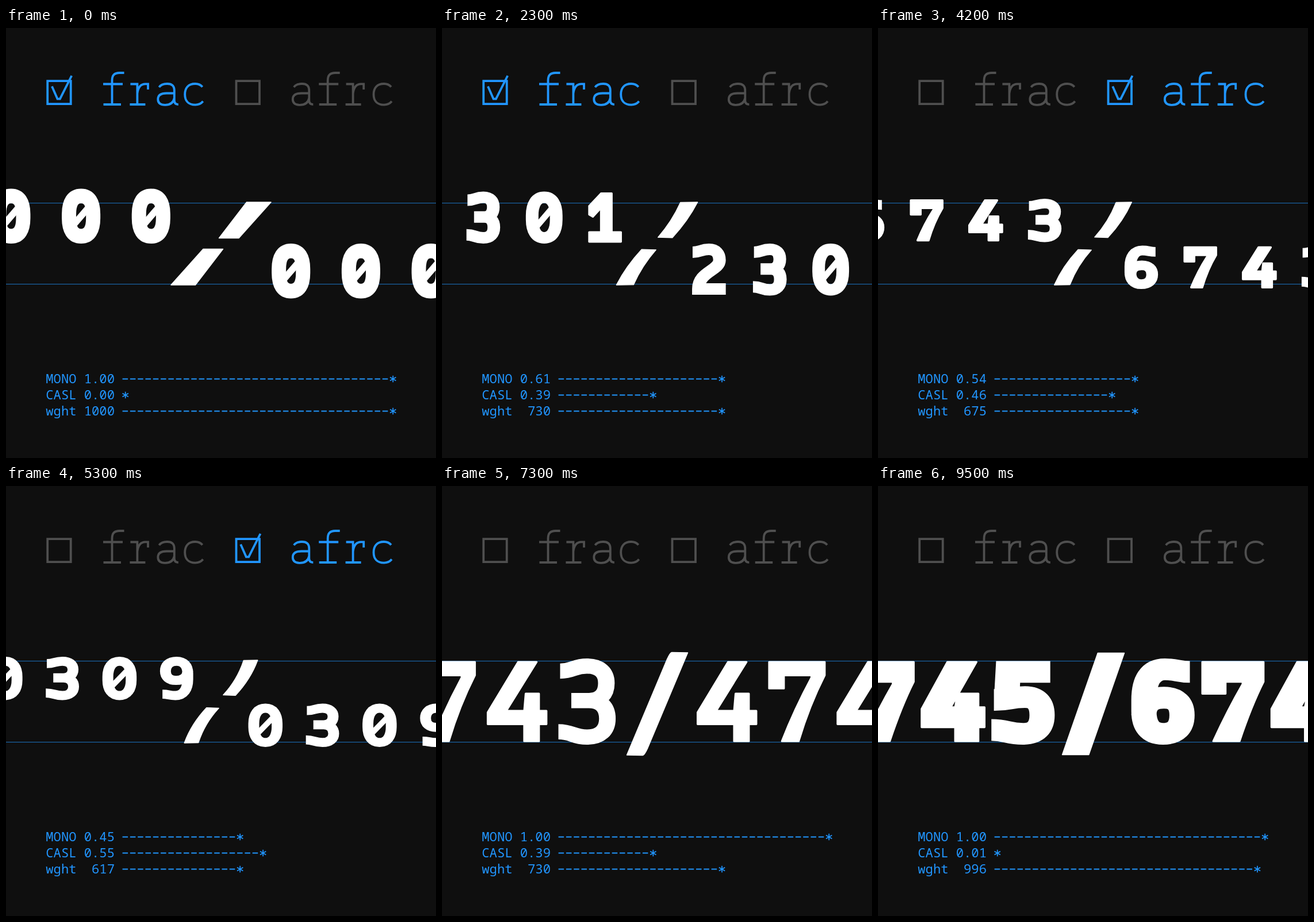
An HTML page for the animation above (9600 ms loop, 748 by 748 pixels).

```html
<!DOCTYPE html>
<html lang="en">
<head>
<meta charset="utf-8">
<title>Fractions</title>
<style>
html, body { margin: 0; width: 100%; height: 100%; overflow: hidden; background: #0f0f0f; }
svg { display: block; width: 100vw; height: 100vh; }
text { font: 500 22.16px "Noto Sans Mono", "DejaVu Sans Mono", monospace; white-space: pre; fill: #2196ff; }
.head path { fill: none; stroke: currentColor; stroke-width: 3.8; }
.bar path { fill: none; stroke: #2196ff; stroke-width: 2.1; }
.bar .star { stroke-width: 1.7; }
</style>
</head>
<body>
<svg viewBox="0 0 748 748" xmlns="http://www.w3.org/2000/svg">
  <rect width="748" height="748" fill="#0f0f0f"/>
  <g class="head" id="head"></g>
  <path d="M0 304.6H748M0 445.6H748" stroke="#2196ff" stroke-width=".75"/>
  <g id="figures"></g>
  <g class="bar" id="bars"></g>
</svg>
<script>
const $ = id => document.getElementById(id);
const BLUE = '#2196ff', GREY = '#4f4f4f';
const STEP = 100, PART = 32, MID = 374;
const ROUND = 1.7; // corner radius of filled figures

// Values at weights 300, 730 and 1000
const modes = [
  { e: [29.2, 29.3, 30.8], H: [85.5, 90.5, 95.5], sx: [11.5, 22, 25], sy: [10.8, 20, 25.5],
    over: 1.6, bottom: 375, top: 375, zero: 1.09 },
  { e: [27.5, 29.5, 32], H: [75.5, 75.5, 81], sx: [10.5, 22, 26], sy: [9.5, 18, 22],
    over: 1.2, bottom: 372.4, top: 378.6, zero: 1.03 },
  { e: [46, 50, 55], H: [149, 150, 150], sx: [11.5, 29, 44], sy: [10.5, 26.5, 38],
    over: 4.4, bottom: 450, top: 300, zero: 1.04 }
];

const lerp = (a, b, t) => a + (b - a) * t;
const byWeight = (v, w) => w < 730
  ? lerp(v[0], v[1], (w - 300) / 430)
  : lerp(v[1], v[2], (w - 730) / 270);
const num = v => +v.toFixed(2);

class Pen {
  constructor(k) { this.k = k; this.d = ''; }
  add(op, ...pts) {
    this.d += op + pts.map(num).join(' ');
    [this.x, this.y] = pts.slice(-2);
    return this;
  }
  m(x, y) { return this.add('M', x, y); }
  l(x, y) { return this.add('L', x, y); }
  q(a, b, x, y) { return this.add('Q', a, b, x, y); }
  c(a, b, c, d, x, y) { return this.add('C', a, b, c, d, x, y); }
  // quarter turns that leave horizontally / vertically
  h(x, y) { return this.c(this.x + this.k * (x - this.x), this.y, x, y - this.k * (y - this.y), x, y); }
  v(x, y) { return this.c(this.x, this.y + this.k * (y - this.y), x - this.k * (x - this.x), y, x, y); }
  // shallow wave, level at both ends so that terminals are cut upright
  s(x, y) { const m = (this.x + x) / 2; return this.c(m, this.y, m, y, x, y); }
}

// Stroked figures: h, Y are half sizes of the centre line, e the outer half width, F the flat half height
const six = (p, h, e, Y) => p.m(.85 * e, -.92 * Y).s(.1 * h, -Y).h(-h, -.05 * Y)
  .l(-h, .3 * Y).v(0, Y).h(h, .42 * Y).v(.05 * h, -.12 * Y).h(-h, .42 * Y);
const stroked = {
  0: (p, h, e, Y) => p.m(0, -Y).h(h, -.1 * Y).l(h, .1 * Y).v(0, Y).h(-h, .1 * Y).l(-h, -.1 * Y).v(0, -Y),
  2: (p, h, e, Y, F) => p.m(-.97 * e, -.86 * Y).s(0, -Y).h(h, -.46 * Y)
    .c(h, .05 * Y, -h, .1 * Y, -h, F).l(e, F),
  3: (p, h, e, Y) => p.m(-.94 * e, -.86 * Y).s(0, -Y).h(.95 * h, -.52 * Y)
    .v(.1 * h, -.03 * Y).l(-.55 * e, -.03 * Y)
    .m(.1 * h, -.03 * Y).h(h, .48 * Y).v(0, Y).s(-e, .85 * Y),
  5: (p, h, e, Y, F) => p.m(.86 * e, -F).l(.13 * e - h, -F).l(.08 * e - h, -.05 * Y)
    .m(-.92 * e, -.05 * Y).s(.1 * h, -.14 * Y)
    .h(h, .42 * Y).v(0, Y).s(-e, .88 * Y),
  6: six,
  8: (p, h, e, Y) => p.m(0, -Y).h(.84 * h, -.54 * Y).c(.84 * h, -.1 * Y, -h, -.04 * Y, -h, .48 * Y)
    .v(0, Y).h(h, .48 * Y).c(h, -.04 * Y, -.84 * h, -.1 * Y, -.84 * h, -.54 * Y).v(0, -Y),
  9: (p, h, e, Y) => six(p, -h, -e, -Y)
};

// Filled figures: y runs from 0 to H
const filled = {
  1(p, e, H, sx, sy) {
    const l = .08 * e - sx / 2, r = l + sx, f = .26 * H;
    p.m(l, 0).l(r, 0).l(r, H - sy).l(e, H - sy).l(e, H).l(-e, H).l(-e, H - sy).l(l, H - sy)
      .l(l, .1 * H + .9 * sx).l(-e + .35 * sx, f + sx).l(-e, f + .8 * sx).l(-e, f);
  },
  4(p, e, H, sx, sy) {
    const r = .5 * e + .33 * sx, wide = 1.25 * sx, low = .71 * H + .45 * sy, up = low - sy;
    const s = .62 * e + .25 * sx;
    p.m(r - wide, 0).l(r, 0).l(-e + wide, up).l(s - sx, up).l(s - .9 * sx, .4 * H).l(s, .4 * H)
      .l(s, up).l(e, up).l(e, low).l(s, low).l(s, H).l(s - sx, H).l(s - sx, low).l(-e, low).l(-e, up + .02 * H);
  },
  7(p, e, H, sx, sy, cas) {
    const a = -.3 * e - .45 * sx, b = a + 1.13 * sx, i = e - .9 * sx, s = .8 * sy + .2 * H;
    const bend = .22 * e * cas;
    p.m(-e, 0).l(e, 0).l(e, sy).q((e + b) / 2 - bend, .55 * H, b, H).l(a, H)
      .q((i + a) / 2 - bend, .6 * H, i, sy + .03 * H).l(i, sy).l(-e + sx, sy).l(-e + sx, s).l(-e, s);
  }
};

function figure(n, x, top, g) {
  const p = new Pen(lerp(.66, .6, g.cas));
  if (filled[n]) {
    const e = g.e + (n === 4 ? .13 * (g.e - g.sx) : 0) - ROUND, cut = 2 * ROUND;
    filled[n](p, e, g.H - 2 * g.over - cut, g.sx - cut, g.sy - cut, g.cas);
    return `<path transform="translate(${num(x)} ${num(top + g.over + ROUND)})" d="${p.d}Z" ` +
      `fill="#fff" stroke="#fff" stroke-width="${cut}" stroke-linejoin="round"/>`;
  }
  const a = g.sx / g.sy, e = g.e * (n === 0 ? g.zero : 1) / a;
  const h = e - g.sy / 2, Y = (g.H - g.sy) / 2;
  stroked[n](p, h, e, Y, Y - g.over);
  const bar = n === 0
    ? `<path d="M${num(-h)} ${num(.7 * Y)}L${num(h)} ${num(-.7 * Y)}" stroke-width="${num(g.sy * .3 + 4)}"/>` : '';
  return `<g transform="translate(${num(x)} ${num(top + g.H / 2)}) scale(${num(a)} 1)" ` +
    `fill="none" stroke="#fff"><path d="${p.d}${n === 0 ? 'Z' : ''}" stroke-width="${num(g.sy)}"/>${bar}</g>`;
}

const ink = d => `<path d="${d}Z" fill="#fff" stroke="#fff" stroke-width="1.4" stroke-linejoin="round"/>`;

// Two halves that mirror each other through one point
function splitSlash(mono, cas) {
  const p = new Pen(0);
  const tl = lerp(35, 44.5, mono), tr = lerp(44.5, 87, mono);
  const bl = lerp(10, -3.5, mono), br = lerp(20, 31, mono), t = -72, b = lerp(-11.5, -9.5, mono);
  p.m(tl, t + cas).l(tr, t)
    .q((tr + br) / 2 + 13 * cas, (t + b) / 2 + 5 * cas, br, b)
    .l(bl, b - 1.5 * cas)
    .q((tl + bl) / 2 + 12 * cas, (t + b) / 2 + 7 * cas, tl, t + cas);
  return `<g transform="translate(${MID} 375)">${ink(p.d)}<g transform="rotate(180)">${ink(p.d)}</g></g>`;
}

function fullSlash(w, cas) {
  const p = new Pen(0);
  const l = byWeight([40.5, 22, 7.5], w), r = byWeight([52, 53, 54], w), y = lerp(88.5, 91, cas);
  const c = 8 * cas, drop = 30 * cas;
  const x = l - drop * (l + r) / (2 * y);
  p.m(l + c, -y).l(r, -y + cas).l(-x, y - drop).q(-l - c * .2, y, -l - c, y)
    .l(-r, y - cas).l(x, -y + drop).q(l + c * .2, -y, l + c, -y);
  return `<g transform="translate(374.5 379)">${ink(p.d)}</g>`;
}

// Each place of the four-figure cycle is renewed in turn
function digit(place, i) {
  const s = (place % 4 + 4) % 4, turn = Math.floor((i - (4 - s) % 4) / 4);
  return turn < 0 ? 0 : (2 * turn + s) % 10;
}

function figures(mode, i, mono, cas, w) {
  const m = modes[mode], g = { cas, over: m.over, zero: m.zero };
  for (const key of ['e', 'H', 'sx', 'sy']) g[key] = byWeight(m[key], w);
  const pitch = lerp(80.7, 121.7, mono), first = lerp(40.4, 121.7, mono);
  let out = mode === 2 ? fullSlash(w, cas) : splitSlash(mono, cas);
  for (let j = 1; j <= 6; j++) {
    const dx = first + (j - 1) * pitch;
    if (dx > 440) break;
    out += figure(digit(2 - j, i), MID - dx, m.bottom - g.H, g);
    out += figure(digit(j + 1, i), MID + dx, m.top, g);
  }
  return out;
}

const letters = {
  f: 'M19 78H11Q-2 78-2 91V133M-17.5 97.5H16.5M-17 133H13.5',
  r: 'M-17 97.5H-5V133M-18 133H9M-5 114Q-3 97.3 9 97.3H13.6V107',
  a: 'M-14 103Q-10 97 0 97Q12.5 97 12.5 109V126Q12.5 133 19.5 133' +
     'M12.5 113.5H-1Q-16 113.5-16 124Q-16 133.8-3.5 133.8Q10 133.8 12.5 122',
  c: 'M14.5 102.5Q10 97 2 97C-10.5 97-16 105-16 115.4C-16 126-10.5 133.6 2 133.6Q10.5 133.6 15.5 127.5'
};
const box = 'M-20.5 92.1H20V132.1H-20.5Z', tick = 'M-12.8 101.5L-3.2 123.3H1.2L21.5 83';

function option(word, cell, on) {
  const at = (k, d) => `<path transform="translate(${num(69.26 + 46.9 * (cell + k + .5))} 0)" d="${d}"/>`;
  return `<g role="img" aria-label="${word}" color="${on ? BLUE : GREY}">` + at(0, box) + (on ? at(0, tick) : '') +
    [...word].map((ch, k) => at(k + 2, letters[ch])).join('') + '</g>';
}

function axis(row, label, value, part) {
  const n = Math.max(0, Math.floor(36 * part) - 1), y = 617.5 + 28 * row, c = y - 7;
  const x = num(207.7 + 13.3 * n);
  const dashes = n ? `<path d="M202.6 ${c}h${num(13.3 * n - 3.5)}" stroke-dasharray="9.5 3.8"/>` : '';
  return `<text x="69.3" y="${y}">${label} ${value}</text>${dashes}` +
    `<path class="star" d="M${x} ${c - 5.8}v11.6M${x - 5.2} ${c - 3}l10.4 6m0-6l-10.4 6"/>`;
}

let last = -1;
function draw(ms) {
  const frame = Math.floor(ms / STEP) % (3 * PART);
  if (frame === last) return;
  last = frame;
  const mode = Math.floor(frame / PART), i = frame % PART;
  const u = Math.abs(i - PART / 2) / (PART / 2);
  const heavy = 1.5 * u - .5 * u ** 3;
  const mono = mode === 2 ? 1 : heavy, cas = 1 - heavy, w = 300 + 700 * heavy;
  $('head').innerHTML = option('frac', 0, mode === 0) + option('afrc', 7, mode === 1);
  $('figures').innerHTML = figures(mode, i, mono, cas, w);
  $('bars').innerHTML = axis(0, 'MONO', mono.toFixed(2), mono) + axis(1, 'CASL', cas.toFixed(2), cas) +
    axis(2, 'wght', String(Math.round(w)).padStart(4, '\u00a0'), heavy);
}

const start = performance.now();
function loop() {
  draw(performance.now() - start);
  requestAnimationFrame(loop);
}
loop();
</script>
</body>
</html>
```
